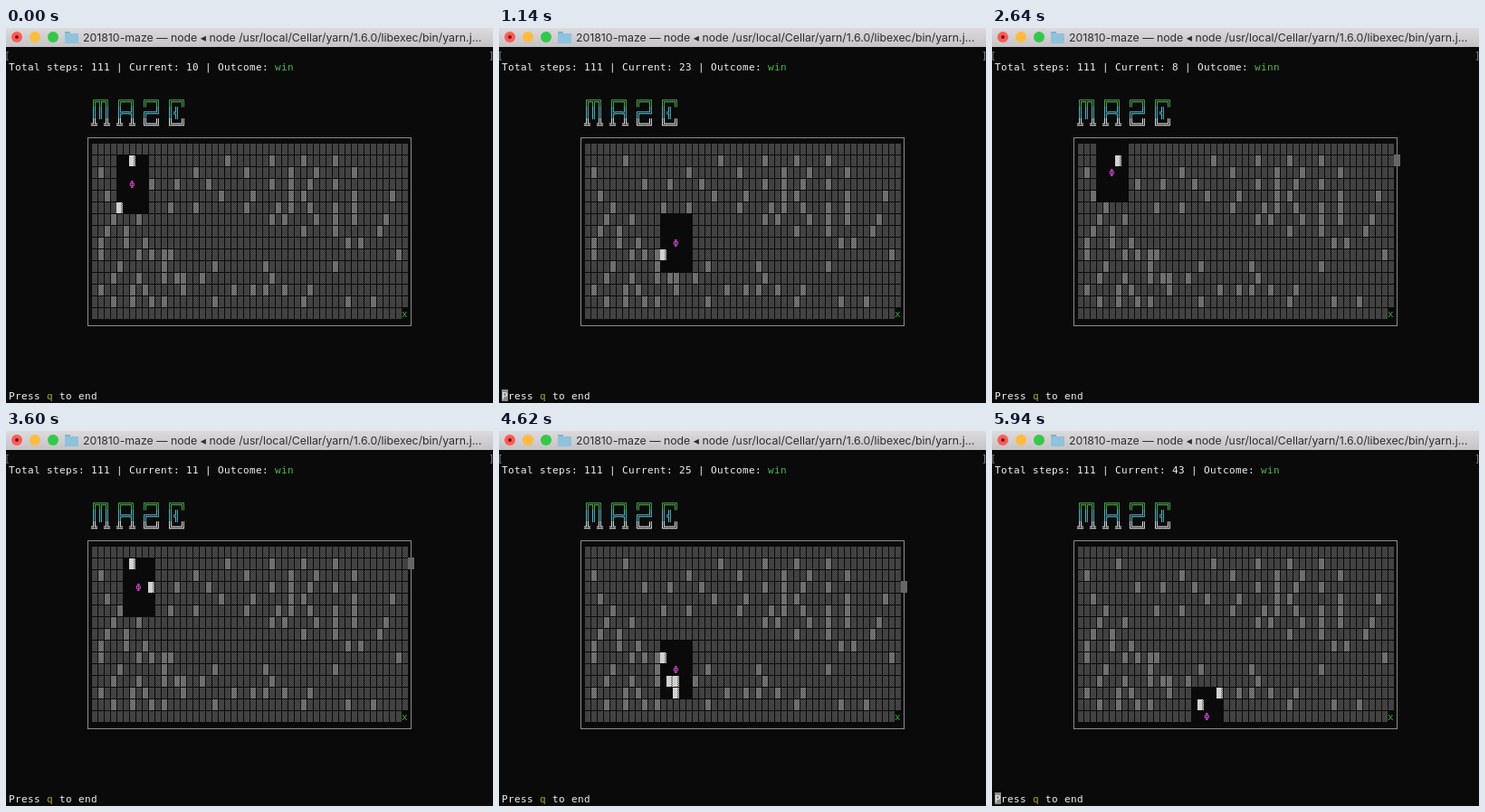
Write an HTML page with a canvas that moves like this. It is 538 px wide and 415 px high and loops after 6 s.

```html
<!DOCTYPE html>
<html lang="en">
<head>
<meta charset="utf-8">
<title>Maze</title>
<style>
html, body { margin: 0; width: 100%; height: 100%; overflow: hidden; background: #0a0a0a; }
canvas { display: block; }
</style>
</head>
<body>
<canvas id="stage" width="538" height="415"></canvas>
<script>
const ctx = document.getElementById('stage').getContext('2d');
const LOOP = 6000, TICK = 60;
const CW = 7, CH = 13, LEFT = 3, TOP = 23;       // terminal cell grid
const MAZE_COL = 13, MAZE_ROW = 8, COLS = 50, ROWS = 15;
const MONO = '"DejaVu Sans Mono", monospace';
const BLACK = '#0a0a0a', WHITE = '#f0f0f0', GREEN = '#4fb554', CYAN = '#5cc3d0';

const walls = [
  [],
  [6, 21, 28, 33, 38],
  [1, 16, 24, 31, 35, 41],
  [9, 13, 18, 28, 31, 34, 38],
  [2, 20, 25, 31, 33, 41, 47],
  [4, 12, 16, 24, 29, 31, 34, 38, 41],
  [3, 7, 28, 30, 35, 38, 41, 46],
  [2, 5, 33, 38, 45],
  [1, 5, 8, 40, 42],
  [1, 7, 9, 11, 12, 48],
  [4, 11, 19, 27, 38],
  [3, 7, 11, 13, 14, 17, 28],
  [1, 6, 8, 14, 22, 25, 27, 30, 34],
  [3, 6, 9, 11, 19, 33, 40, 44],
  []
];

// Player cell for each step, beginning at step 6
const FIRST_STEP = 6;
const path = [[4, 1]];
for (const move of 'RDRDR' + 'RDRRR' + 'DDRDRDR' + 'DD' + 'RDDDRRRUUUURRDDDDD') {
  const [x, y] = path[path.length - 1];
  path.push([x + (move === 'R'), y + (move === 'D') - (move === 'U')]);
}

// Forward, rewind, then forward again
function stepAt(t) {
  if (t < 1500) return Math.min(23, 10 + Math.floor(t / 85));
  if (t < 2880) return Math.max(7, 22 - Math.floor((t - 1500) / 80));
  if (t < 3300) return 6;
  return 7 + Math.floor((t - 3300) * 3 / 220);
}

function isIdle(t) {
  return (t >= 1140 && t < 1500) || (t >= 2760 && t < 3300) || t >= 5880;
}

function rect(x, y, w, h, color) {
  ctx.fillStyle = color;
  ctx.fillRect(x, y, w, h);
}

function cell(col, row, color) {
  rect(LEFT + col * CW, TOP + row * CH, CW, CH, color);
}

function write(text, col, row, color, size = 11) {
  ctx.font = `${size}px ${MONO}`;
  ctx.fillStyle = color;
  [...text].forEach((ch, i) => ctx.fillText(ch, LEFT + (col + i) * CW, TOP + row * CH + 11));
}

function disc(x, y, r, color) {
  ctx.fillStyle = color;
  ctx.beginPath();
  ctx.arc(x, y, r, 0, 7);
  ctx.fill();
}

// A dotted block glyph with dark gaps at its left and top
function shade(base, dot, gap, hasDot) {
  const tile = document.createElement('canvas');
  tile.width = CW;
  tile.height = CH;
  const c = tile.getContext('2d');
  c.fillStyle = BLACK;
  c.fillRect(0, 0, CW, CH);
  c.fillStyle = base;
  c.fillRect(gap, 1, CW, CH);
  c.fillStyle = dot;
  for (let y = 1; y < CH; y++)
    for (let x = gap; x < CW; x++)
      if (hasDot(x, y)) c.fillRect(x, y, 1, 1);
  return tile;
}

const checker = (x, y) => (x + y) % 2;
const fogTile = shade('#343434', '#505050', 1, checker);
const dimWallTile = shade('#5a5a5a', '#848484', 1, checker);
const wallTile = shade('#d2d2d2', '#555', 0, (x, y) => x > 4 && checker(x, y));

function drawTitleBar() {
  const bar = ctx.createLinearGradient(0, 0, 0, 21);
  bar.addColorStop(0, '#dcdadc');
  bar.addColorStop(1, '#c5c3c5');
  rect(0, 0, 538, 21, bar);
  disc(12, 10, 6, '#fc5b57');
  disc(12, 10, 2, '#7a1512');
  disc(32, 10, 6, '#fdbc40');
  disc(52, 10, 6, '#34c84a');
  rect(65, 4, 6, 3, '#7fb4d0');
  rect(65, 6, 15, 11, '#8fc2dc');
  ctx.font = '12.3px Inter, sans-serif';
  ctx.fillStyle = '#2e2e2e';
  ctx.fillText('201810-maze — node ◂ node /usr/local/Cellar/yarn/1.6.0/libexec/bin/yarn.j…', 85, 14.5);
}

function drawLogo() {
  write('╔╦╗ ╔═╗ ╔═╗ ╔═╗', 13, 3.95, GREEN, 11.63);
  write('║║║ ╠═╣ ╔═╝ ║╣', 13, 4.95, CYAN, 11.63);
  write('╩ ╩ ╩ ╩ ╚═╝ ╚═╝', 13, 5.95, WHITE, 11.63);
}

function drawMaze([px, py]) {
  ctx.strokeStyle = '#8c8c8c';
  ctx.strokeRect(90.5, 121.5, 357, 208);
  for (let y = 0; y < ROWS; y++)
    for (let x = 0; x < COLS; x++) {
      const seen = Math.abs(x - px) <= 2 && Math.abs(y - py) <= 2;
      const wall = walls[y].includes(x);
      const isExit = x === COLS - 1 && y === ROWS - 1;
      if (isExit || (seen && !wall)) continue;
      const tile = wall ? (seen ? wallTile : dimWallTile) : fogTile;
      ctx.drawImage(tile, LEFT + (MAZE_COL + x) * CW, TOP + (MAZE_ROW + y) * CH);
    }
  write('Φ', MAZE_COL + px, MAZE_ROW + py, '#d544d0');
  write('x', MAZE_COL + COLS - 1, MAZE_ROW + ROWS - 1, '#35a53c');
}

// The terminal cursor hops between the prompt and the maze's right edge
function drawCursor(t) {
  const n = t / TICK;
  if (isIdle(t) || n % 3 === 1) cell(0, 29, '#8a8a8a');
  else if (n > 0) cell(63, MAZE_ROW + (n % 4 ? 3 : 1), '#666');
}

function draw(t) {
  const step = stepAt(t);
  rect(0, 0, 538, 415, BLACK);
  drawTitleBar();
  ctx.font = `11px ${MONO}`;
  ctx.fillStyle = '#888';
  ctx.fillText('[', -2, 34);
  ctx.fillText(']', 533, 34);

  const status = `Total steps: 111 | Current: ${step} | Outcome: `;
  write(status, 0, 1, WHITE);
  write(step < 10 ? 'winn' : 'win', status.length, 1, GREEN);
  drawLogo();
  drawMaze(path[step - FIRST_STEP]);
  drawCursor(t);
  write('Press', 0, 29, WHITE);
  write('q', 6, 29, '#a8a53a');
  write('to end', 8, 29, WHITE);
}

function frame() {
  const t = performance.now() % LOOP;
  draw(Math.floor(t / TICK) * TICK);
  requestAnimationFrame(frame);
}
frame();
</script>
</body>
</html>
```
